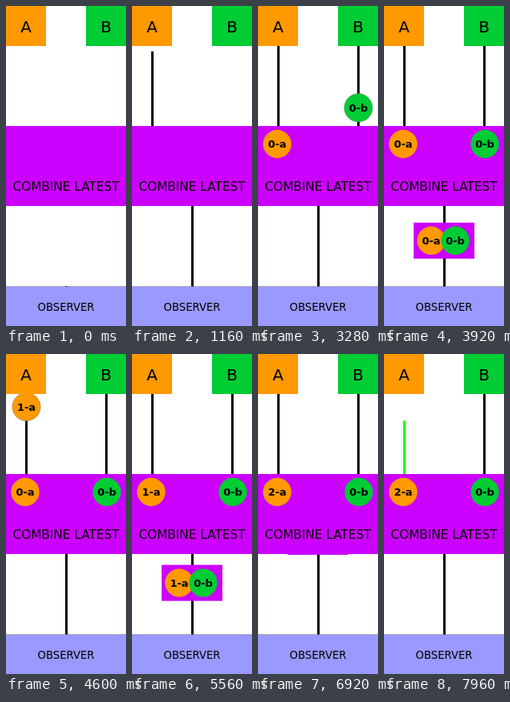
These frames come from a looping animation (150 by 400 pixels, 8000 ms). An HTML page with a canvas:

```html
<!DOCTYPE html>
<html lang="en">
<head>
<meta charset="utf-8">
<title>Combine latest</title>
<style>
  html, body { margin: 0; height: 100%; overflow: hidden; background: #fff; }
  canvas { display: block; width: 150px; height: 400px; }
</style>
</head>
<body>
<canvas id="stage" width="150" height="400"></canvas>
<script>
const ctx = document.getElementById('stage').getContext('2d');
const LOOP = 8000, STEP = 40, TRAVEL = 800;
const ORANGE = '#ff9900', GREEN = '#00cc33', PURPLE = '#cc00ff', BLUE = '#9999ff';

// Values travelling from a source into the operator
const emissions = [
  { at: 1240, x: 24, label: '0-a', color: ORANGE },
  { at: 2720, x: 125.5, label: '0-b', color: GREEN },
  { at: 4400, x: 25.5, label: '1-a', color: ORANGE },
  { at: 6080, x: 25.5, label: '2-a', color: ORANGE }
];
const pairStarts = [3560, 5240, 6920];
const A_COMPLETES = 7760;

const progress = (t, start, duration) => Math.min(1, Math.max(0, (t - start) / duration));
const mix = (from, to, p) => from + (to - from) * p;
const isActive = (t, start) => t >= start && t <= start + TRAVEL;

function rect(color, x, y, w, h) {
  ctx.fillStyle = color;
  ctx.fillRect(x, y, w, h);
}

function text(label, x, baseline, size, weight = 'normal') {
  ctx.font = `${weight} ${size}px "DejaVu Sans", sans-serif`;
  ctx.textAlign = 'center';
  ctx.fillStyle = '#000';
  ctx.fillText(label, x, baseline);
}

function ball(x, y, label, color, outlined) {
  ctx.beginPath();
  ctx.arc(x, y, 17.7, 0, Math.PI * 2);
  ctx.fillStyle = color;
  ctx.fill();
  if (outlined) {
    ctx.lineWidth = 0.5;
    ctx.strokeStyle = '#777';
    ctx.stroke();
  }
  text(label, x, y + 4.8, 13, 'bold');
}

function wire(x, bottom, top, color = '#000') {
  rect(color, x, top, 3, bottom - top);
}

function latest(t, source) {
  return emissions.filter(e => e.label.endsWith(source) && t >= e.at + TRAVEL + STEP).pop();
}

function draw(t) {
  rect('#fff', 0, 0, 150, 400);

  // Subscriptions grow upwards
  wire(74, 351, mix(350, 250, progress(t, 0, 560)));
  if (t < A_COMPLETES) wire(24, 150, mix(150, 50, progress(t, 600, 600)));
  else wire(24, 150, mix(50, 150, progress(t, A_COMPLETES, 600)), '#00ff00');
  wire(124, 150, mix(150, 50, progress(t, 2080, 600)));

  for (const e of emissions) {
    if (isActive(t, e.at)) {
      ball(e.x, mix(32, 168, progress(t, e.at, TRAVEL)), e.label, e.color, true);
    }
  }

  const a = latest(t, 'a'), b = latest(t, 'b');
  for (const start of pairStarts) {
    if (!isActive(t, start)) continue;
    const y = mix(228, 372, progress(t, start, TRAVEL));
    rect(PURPLE, 37, y - 22, 76, 45);
    ball(59, y + 0.5, a.label, ORANGE);
    ball(89, y + 0.5, b.label, GREEN);
  }

  rect(ORANGE, 0, 0, 50, 50);
  text('A', 25, 33, 20);
  rect(GREEN, 100, 0, 50, 50);
  text('B', 125, 33, 20);

  rect(PURPLE, 0, 150, 150, 100);
  text('COMBINE LATEST', 75, 231, 15.3);
  if (a) ball(24, 172.5, a.label, ORANGE);
  if (b) ball(126, 172.5, b.label, GREEN);

  rect('rgba(120, 120, 130, 0.6)', 0, 350, 150, 1);
  rect(BLUE, 0, 351, 150, 49);
  text('OBSERVER', 75, 380.5, 13.2);
}

const began = performance.now();
function frame() {
  const t = (performance.now() - began) % LOOP;
  draw(Math.floor(t / STEP) * STEP);
  requestAnimationFrame(frame);
}
frame();
</script>
</body>
</html>
```
